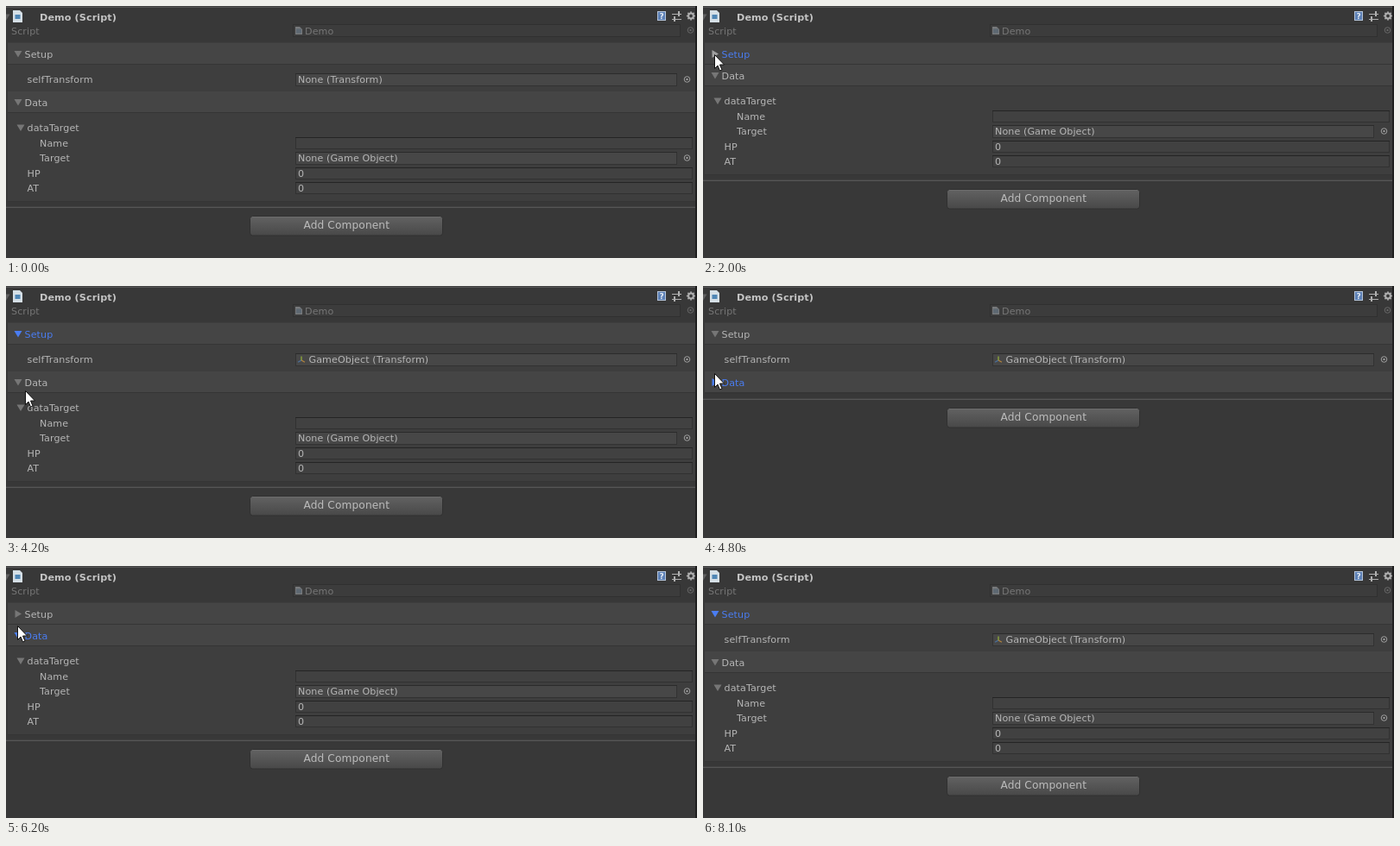
An HTML page with a canvas for the animation above (8400 ms loop, 800 px wide and 292 px high).

```html
<!DOCTYPE html>
<html lang="en">
<head>
<meta charset="utf-8">
<title>Inspector foldouts</title>
<style>
html, body { margin: 0; width: 100%; height: 100%; overflow: hidden; background: #383838; }
canvas { display: block; }
</style>
</head>
<body>
<canvas id="stage" width="800" height="292"></canvas>
<script>
const ctx = document.getElementById('stage').getContext('2d');
const LOOP = 8400, STEP = 100;
const TEXT = '#b6b6b6', DIM = '#767676', BLUE = '#4a7df2', GREY = '#767676', ICON = '#b0b0b0';
const SETUP_Y = 43, HEAD_H = 25, SETUP_H = 31, DATA_H = 102;
const DRAG_START = 2800, DROP = 3600;

// A click shows as pressed for one step, then toggles its section
const clicks = [
  { at: 1400, name: 'Setup' }, { at: 2000, name: 'Setup' },
  { at: 4600, name: 'Data' }, { at: 5200, name: 'Setup' },
  { at: 5800, name: 'Data' }, { at: 6500, name: 'Setup' }
];

const setupPos = { x: 13, y: 56 }, exit = { x: -14, y: 60 };
const dataPos = open => ({ x: 13, y: open ? 112 : 81 });
const at = (t, pos) => ({ t, ...pos });
const visits = [
  [at(500, { x: 58, y: 194 }), at(1200, setupPos), at(2000, setupPos), at(2200, exit)],
  [at(DRAG_START, { x: 10, y: 40 }), at(3300, { x: 347, y: 82 }), at(DROP, { x: 347, y: 85 }),
   at(4000, { x: 95, y: 150 }), at(4200, { x: 22, y: 121 }), at(4500, dataPos(true)),
   at(4700, dataPos(true)), at(5200, setupPos), at(5400, setupPos), at(5600, { x: 10, y: 65 }),
   at(5800, dataPos(false)), at(6000, dataPos(false)), at(6400, setupPos), at(6600, setupPos),
   at(6800, { x: 7, y: 135 }), at(7000, exit)]
];

function pointerAt(t) {
  const path = visits.find(p => t >= p[0].t && t < p.at(-1).t);
  if (!path) return null;
  const i = path.findIndex(p => p.t > t);
  const a = path[i - 1], b = path[i], k = (t - a.t) / (b.t - a.t);
  return { x: a.x + (b.x - a.x) * k, y: a.y + (b.y - a.y) * k };
}

function sectionState(name, t) {
  const done = clicks.filter(c => t >= c.at + STEP);
  return {
    open: done.filter(c => c.name === name).length % 2 === 0,
    focused: done.at(-1)?.name === name,
    pressed: clicks.some(c => c.name === name && c.at === t)
  };
}

function rect(x, y, w, h, fill) {
  ctx.fillStyle = fill;
  ctx.fillRect(x, y, w, h);
}

function frame(x, y, w, h, fill, edge, top = edge) {
  rect(x, y, w, h, edge);
  rect(x, y, w, 1, top);
  rect(x + 1, y + 1, w - 2, h - 2, fill);
}

function text(str, x, y, color = TEXT, font = '11.1px') {
  ctx.font = font + ' "DejaVu Sans", Verdana, sans-serif';
  ctx.letterSpacing = '0.1px';
  ctx.fillStyle = color;
  ctx.fillText(str, x, y);
}

function poly(points, fill, edge) {
  ctx.beginPath();
  points.forEach(([x, y]) => ctx.lineTo(x, y));
  ctx.closePath();
  if (fill) { ctx.fillStyle = fill; ctx.fill(); }
  if (edge) { ctx.strokeStyle = edge; ctx.lineWidth = 1; ctx.stroke(); }
}

function ring(x, y, r, color, width = 1) {
  ctx.strokeStyle = color;
  ctx.lineWidth = width;
  ctx.beginPath();
  ctx.arc(x, y, r, 0, 2 * Math.PI);
  ctx.stroke();
}

function arrow(x, y, open, color) {
  poly(open ? [[x - 4.5, y - 3.5], [x + 4.5, y - 3.5], [x, y + 4]]
            : [[x - 3.5, y - 4.5], [x + 4, y], [x - 3.5, y + 4.5]], color);
}

function picker(x, y, color = '#a0a0a0') {
  ring(x, y, 3.3, color);
  rect(x - 1, y - 1, 2, 2, color);
}

function objectField(y, str, indent = 0) {
  frame(335, y - 7, 442, 15, '#474747', '#323232', '#2b2b2b');
  text(str, 338 + indent, y + 4);
  picker(788.5, y);
}

function textField(y, str) {
  frame(335, y - 7, 460, 14, '#414141', '#313131', '#242424');
  text(str, 338, y + 4);
}

function page(x, y, w, h, fill, mark) {
  poly([[x, y], [x + w - 3, y], [x + w, y + 3], [x + w, y + h], [x, y + h]], fill);
  rect(x + w / 2 - 3, y + h / 2 - 2, 6, 5, mark);
}

function separator(y) {
  rect(0, y - 1, 798, 1, '#424242');
  rect(0, y, 798, 1, '#565656');
}

function gear(x, y) {
  ring(x, y, 2.9, ICON, 2);
  for (let a = 0; a < 2 * Math.PI; a += Math.PI / 4) {
    rect(x + 4.3 * Math.cos(a) - .8, y + 4.3 * Math.sin(a) - .8, 1.6, 1.6, ICON);
  }
}

function titleBar() {
  separator(1);
  arrow(0, 13, true, '#606060');
  page(8, 5, 11, 14, '#d5dfe6', '#4f86b5');
  text('Demo (Script)', 39, 16.5, '#c4c4c4', 'bold 11.2px');
  frame(754, 6, 10, 11, '#5c80b5', '#b4c3d8');
  text('?', 756.5, 15, '#e8eef6', 'bold 9px');
  for (const [y, tick] of [[9, 778], [15, 773]]) {
    rect(771, y, 11, 1, ICON);
    rect(tick, y - 3, 2, 6, ICON);
  }
  gear(793, 11.5);
  text('Script', 6, 32.5, DIM);
  frame(332, 21, 449, 15, '#3c3c3c', '#303030');
  page(335, 24, 8, 9, '#77797b', '#5d6872');
  text('Demo', 346, 32.5, DIM);
  picker(792.5, 28, '#686868');
}

function section(y, name, { open, focused, pressed }) {
  rect(2, y, 796, HEAD_H, '#454545');
  rect(2, y + HEAD_H - 1, 796, 1, '#353535');
  arrow(14, y + 12.5, open, pressed ? '#a0a0a0' : focused ? BLUE : GREY);
  text(name, 21.5, y + 16.5, focused ? BLUE : TEXT);
}

function axesIcon(x, y) {
  ['#4b719d', '#8ba53b', '#b1833c'].forEach((color, i) => {
    const a = Math.PI * (5 + 4 * i) / 6;
    ctx.strokeStyle = color;
    ctx.lineWidth = 1.4;
    ctx.beginPath();
    ctx.moveTo(x, y);
    ctx.lineTo(x + 4.5 * Math.cos(a), y + 4.5 * Math.sin(a));
    ctx.stroke();
  });
}

function setupBody(assigned, hover) {
  const y = SETUP_Y + 42;
  text('selfTransform', 24.5, y + 4);
  if (assigned) {
    objectField(y, 'GameObject (Transform)', 12.5);
    axesIcon(342, y + 1);
    return;
  }
  objectField(y, 'None (Transform)');
  if (hover) {
    frame(335, y - 8, 442, 16, '#bdd0f6', '#4773d8');
    text('None (Transform)', 338, y + 4, '#a4b2cc');
  }
}

function dataBody(top) {
  const rowY = i => top + Math.round(42 + 17.5 * i);
  arrow(17, rowY(0), true, GREY);
  ['dataTarget', 'Name', 'Target', 'HP', 'AT'].forEach((label, i) => {
    const nested = i === 1 || i === 2;
    text(label, nested ? 39 : 24.5, rowY(i) + 4);
  });
  textField(rowY(1), '');
  objectField(rowY(2), 'None (Game Object)');
  textField(rowY(3), '0');
  textField(rowY(4), '0');
}

function addButton(y) {
  const shade = ctx.createLinearGradient(0, y, 0, y + 22);
  shade.addColorStop(0, '#626262');
  shade.addColorStop(1, '#484848');
  ctx.beginPath();
  ctx.roundRect(282.5, y - .5, 223, 22.5, 3);
  ctx.fillStyle = shade;
  ctx.fill();
  ctx.strokeStyle = '#303030';
  ctx.lineWidth = 1;
  ctx.stroke();
  rect(285, y, 218, 1, '#6c6c6c');
  text('Add Component', 344.5, y + 14, '#bcbcbc', '12.2px');
}

function pointer({ x, y }, dragging) {
  ctx.save();
  ctx.translate(Math.round(x) + .5, Math.round(y) + .5);
  if (dragging) {
    poly([[3, 13], [11, 13], [13, 16], [13, 22], [3, 22]], null, '#202020');
    frame(9, 19, 11, 10, '#c8c8c8', '#101010');
    rect(12, 23.5, 5, 1, '#000');
    rect(14, 21.5, 1, 5, '#000');
  }
  poly([[0, 0], [0, 16], [3.5, 12.5], [6, 18.5], [8.5, 17.5], [6, 11.5], [11, 11.5]],
    dragging ? '#d6e0f5' : '#fff', '#111');
  ctx.restore();
}

function draw(t) {
  const setup = sectionState('Setup', t), data = sectionState('Data', t);
  const tip = pointerAt(t);
  const dragging = t >= DRAG_START && t < DROP;
  const dataY = SETUP_Y + HEAD_H + (setup.open ? SETUP_H : 0);
  const line = dataY + 32 + (data.open ? DATA_H : 0);

  rect(0, 0, 800, 292, '#383838');
  titleBar();
  rect(2, 42, 796, line - 48, '#3e3e3e');
  section(SETUP_Y, 'Setup', setup);
  if (setup.open) setupBody(t >= DROP, dragging && tip.x >= 335);
  section(dataY, 'Data', data);
  if (data.open) dataBody(dataY);
  rect(2, line - 7, 796, 1, '#353535');
  separator(line);
  addButton(line + 11);
  rect(798, 0, 2, 292, '#1e1e1e');
  if (tip) pointer(tip, dragging);
}

const start = performance.now();
function tick() {
  const t = (performance.now() - start) % LOOP;
  draw(Math.floor(t / STEP) * STEP);
  requestAnimationFrame(tick);
}
tick();
</script>
</body>
</html>
```
